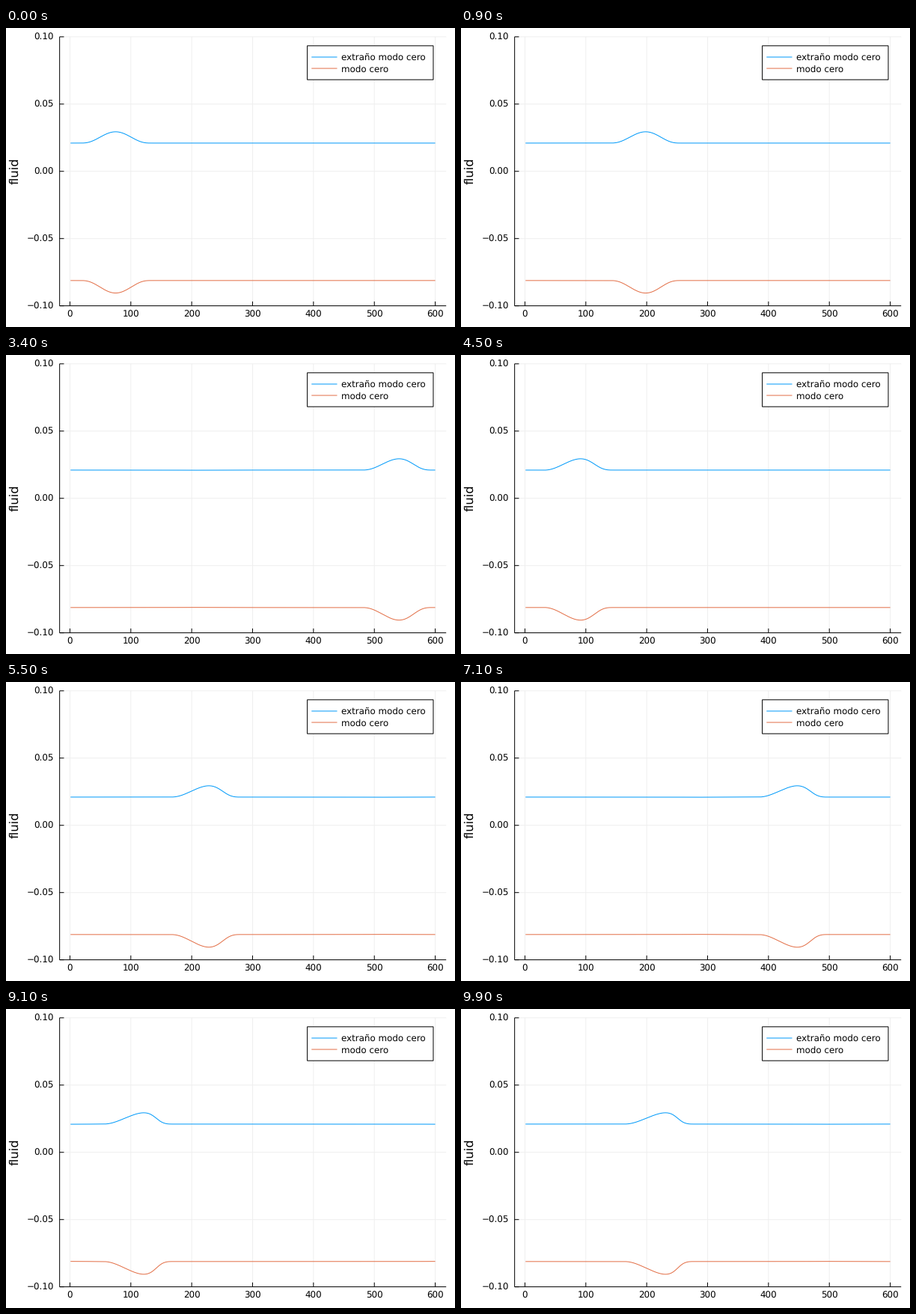
These frames come from a looping animation (600 px wide and 400 px high, 10 s). A matplotlib script:

```python
import numpy as np
import matplotlib.pyplot as plt
from matplotlib.animation import FuncAnimation
from matplotlib.patches import Rectangle

W, H, DPI = 600, 400, 100
FRAMES, INTERVAL = 100, 100
PX = 72 / DPI
BLUE, RED, GRID = "#009AFA", "#E36F47", "#efefef"
LEFT, RIGHT, TOP, BOTTOM = 71.65, 588.19, 11.81, 371.65
X_MIN, X_MAX, Y_MAX = -16.97, 617.97, 0.1
TICK = 5.8

PERIOD = 600
START, HALF = 75, 58
SPEED, STEEPEN = 13.575, 0.12
ECHO_SPEED = 14

plt.rcParams["font.family"] = "DejaVu Sans"
plt.rcParams["text.hinting"] = "none"
fig = plt.figure(figsize=(W / DPI, H / DPI), dpi=DPI, facecolor="white")
ax = fig.add_axes([0, 0, 1, 1])
ax.set_xlim(0, W)
ax.set_ylim(H, 0)
ax.axis("off")


def px_x(v):
    return LEFT + (v - X_MIN) * (RIGHT - LEFT) / (X_MAX - X_MIN)


def px_y(v):
    return TOP + (Y_MAX - v) * (BOTTOM - TOP) / (2 * Y_MAX)


def line(x, y, color="black", width=1.0, **kw):
    return ax.plot(x, y, color=color, lw=width * PX, snap=False,
                   solid_capstyle="butt", **kw)[0]


def label(x, y, text, size=11.9, **kw):
    ax.text(x, y, text, fontsize=size * PX, color="black", **kw)


def draw_axes():
    for v in range(0, 601, 100):
        x = px_x(v)
        line([x, x], [TOP, BOTTOM], GRID, zorder=1)
        line([x, x], [BOTTOM, BOTTOM - TICK], zorder=4)
        label(x, 387.2, str(v), ha="center")
    for v in (-0.10, -0.05, 0.0, 0.05, 0.10):
        y = px_y(v)
        line([LEFT, RIGHT], [y, y], GRID, zorder=1)
        line([LEFT, LEFT + TICK], [y, y], zorder=4)
        label(64, y + 4.4, f"{v:.2f}".replace("-", "\u2212"), ha="right")
    line([LEFT, LEFT], [TOP, BOTTOM], zorder=4)
    line([LEFT, RIGHT], [BOTTOM, BOTTOM], zorder=4)
    label(19.7, 190.9, "fluid", 16.4, rotation=90, ha="right", va="center")


def draw_legend():
    left, top, row = 402.6, 23.8, 15.12
    ax.add_patch(Rectangle((left, top), 570.97 - left, 3 * row, fc="white",
                           ec="black", lw=PX, snap=False, zorder=5))
    rows = ((BLUE, "extraño modo cero"), (RED, "modo cero"))
    for k, (color, text) in enumerate(rows, 1):
        y = top + k * row
        line([408.3, 442.5], [y, y], color, zorder=6)
        label(447.5, y + 4.4, text, zorder=6)


def bump(x, center, shift=0.0):
    """Periodic pulse whose crest leads its foot by `shift`."""
    u = np.linspace(-1, 1, 241)
    h = (1 - u**2) ** 3
    d = (x - center + PERIOD / 2) % PERIOD - PERIOD / 2
    return np.interp(d, HALF * u + shift * h, h, left=0, right=0)


draw_axes()
draw_legend()
xs = np.arange(1, 601)
upper = line([], [], BLUE, zorder=3)
lower = line([], [], RED, zorder=3)


def update(i):
    main = bump(xs, START + SPEED * i, STEEPEN * i)
    echo = 0.0001 * min(1, i / 25) * bump(xs, START - ECHO_SPEED * i)
    grow = 1 + 0.02 * i / FRAMES
    upper.set_data(px_x(xs), px_y(0.0210 + 0.0084 * main - echo))
    lower.set_data(px_x(xs), px_y(-0.0812 - 0.0093 * grow * main + echo))
    return upper, lower


anim = FuncAnimation(fig, update, frames=FRAMES, interval=INTERVAL,
                     repeat=True, repeat_delay=0, blit=False)
plt.show()
```
